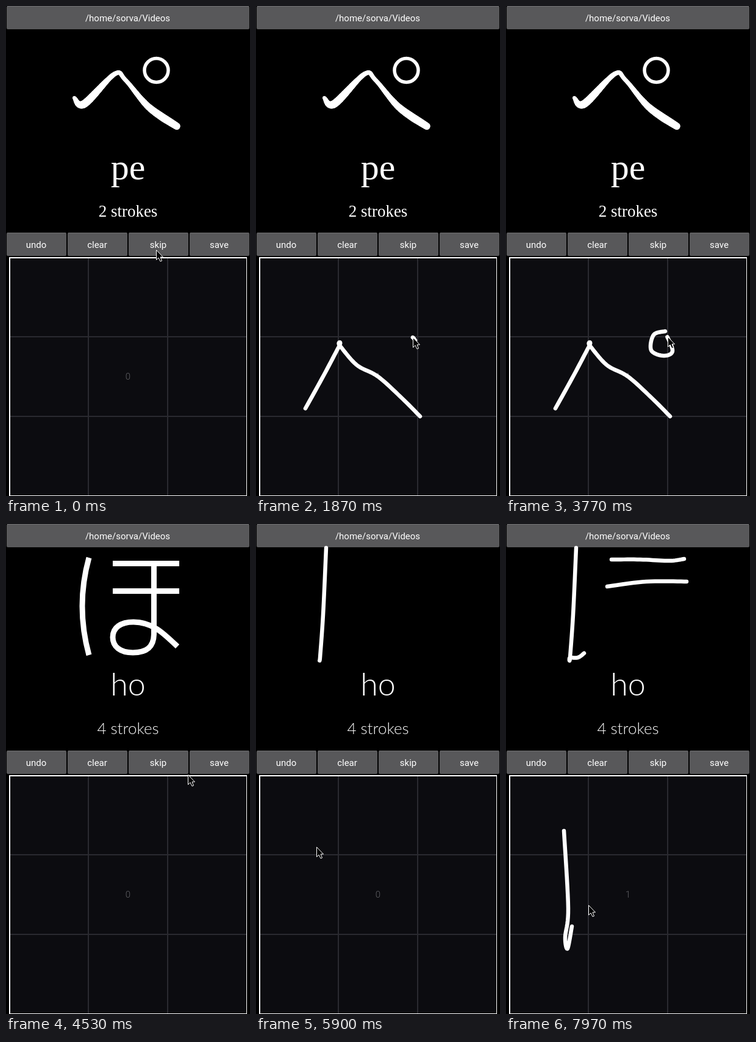
These frames come from a looping animation (400 by 800 pixels, 8000 ms). An HTML page with a canvas:

```html
<!DOCTYPE html>
<html lang="en">
<head>
<meta charset="utf-8">
<title>Kana practice</title>
<style>
  html, body { margin: 0; width: 100%; height: 100%; overflow: hidden; background: #000; }
  canvas { display: block; }
</style>
</head>
<body>
<canvas id="stage" width="400" height="800"></canvas>
<script>
const LOOP = 8000;
const UNDO = 2720, SAVE = 4260, DEMO = 5080;
const WHITE = '#fff';
const ctx = document.getElementById('stage').getContext('2d');

const mix = (a, b, k) => a + (b - a) * k;
const smooth = k => k * k * (3 - 2 * k);
const progress = (s, t) => Math.max(0, Math.min(1, (t - s.from) / (s.to - s.from)));

// Catmull-Rom curve through key points; a doubled point makes a corner
function curve(text) {
  const keys = text.split(' ').map(p => p.split(',').map(Number));
  const at = i => keys[Math.max(0, Math.min(keys.length - 1, i))];
  const points = [keys[0]];
  for (let i = 0; i < keys.length - 1; i++) {
    for (let k = 0.1; k < 1.05; k += 0.1) {
      points.push([0, 1].map(axis => {
        const [a, b, c, d] = [-1, 0, 1, 2].map(n => at(i + n)[axis]);
        return b + k / 2 * (c - a + k * (2 * a - 5 * b + 4 * c - d + k * (3 * (b - c) + d - a)));
      }));
    }
  }
  return points;
}

const stroke = (from, to, until, keys) => ({ from, to, until, points: curve(keys) });
const pause = (from, to, x, y) => ({ from, to, points: [[x, y]] });

// Strokes drawn by hand in the practice square
const penStrokes = [
  stroke(860, 1600, SAVE, '81,657 111,603 137,554 137,554 165,586 200,605 240,641 269,670'),
  stroke(1840, 2280, UNDO, '261,546 255,541 244,555 261,580 281,568 275,562'),
  stroke(3470, 3793, SAVE, '261,531 242,537 238,562 258,571 273,563 261,533'),
  stroke(7230, 7800, LOOP, '95,501 102,627 97,675 101,693 108,657')
];

// Strokes demonstrated above the label
const demoStrokes = [
  stroke(DEMO, 6040, LOOP, '115,39 110,148 105,218 105,218 118,218 128,211'),
  stroke(6380, 7120, LOOP, '173,58 220,58 268,60 292,57'),
  stroke(7220, 7860, LOOP, '166,102 230,94 296,94')
];

// The cursor follows the pen and rests on skip, undo, save and the square
const cursorSteps = [
  ...penStrokes,
  pause(0, 120, 246, 398),
  pause(2670, 2800, 82, 399),
  pause(4130, SAVE, 355, 376),
  pause(5150, 6370, 99, 527),
  pause(7970, LOOP, 135, 622)
].sort((a, b) => a.from - b.from);

const peLine = curve('112,150 128,160 178,111 196,121 234,165 281,197');
const bigHo = new Path2D(`M136,55 Q114,134 136,214 M175,64.5 H284 M175,109.5 H284
  M242.5,65 V180 C242,203 228,210 208,210 C187,210 175,200 175,185
  C175,169 188,160 209,160 C240,160 258,178 281,200`);
const arrow = new Path2D('M0.5,0.5 V16.5 L4,13 L7,19 L9.5,18 L7,12 H11.5 Z');

// The first part of a line, measured along its length
function partial(points, part) {
  const lengths = points.slice(1).map((p, i) => Math.hypot(p[0] - points[i][0], p[1] - points[i][1]));
  let left = part * lengths.reduce((a, b) => a + b, 0);
  const result = [points[0]];
  for (let i = 0; i < lengths.length && left > 0; i++) {
    const k = Math.min(1, left / (lengths[i] || 1));
    result.push([0, 1].map(axis => mix(points[i][axis], points[i + 1][axis], k)));
    left -= lengths[i];
  }
  return result;
}

function setLine(width, cap = 'round', join = 'round') {
  ctx.strokeStyle = WHITE;
  ctx.lineWidth = width;
  ctx.lineCap = cap;
  ctx.lineJoin = join;
}

function drawStroke(s, t) {
  if (t < s.from || t >= s.until) return;
  ctx.beginPath();
  partial(s.points, progress(s, t)).forEach(p => ctx.lineTo(...p));
  setLine(6.5);
  ctx.stroke();
}

function cursorAt(t) {
  const index = cursorSteps.findLastIndex(s => t >= s.from);
  const step = cursorSteps[index], next = cursorSteps[index + 1];
  if (t < step.to || !next) return partial(step.points, progress(step, t)).at(-1);
  const [x, y] = step.points.at(-1);
  const k = smooth((t - step.to) / (next.from - step.to));
  return [mix(x, next.points[0][0], k), mix(y, next.points[0][1], k)];
}

function label(text, x, baseline, font, color = WHITE) {
  ctx.font = font;
  ctx.fillStyle = color;
  ctx.textAlign = 'center';
  ctx.fillText(text, x, baseline);
}

function box(color, x, y, width, height) {
  ctx.fillStyle = color;
  ctx.fillRect(x, y, width, height);
}

function button(text, x, y, width) {
  ctx.fillStyle = '#58585a';
  ctx.beginPath();
  ctx.roundRect(x, y, width, 38, 2);
  ctx.fill();
  box('#707072', x + 1, y, width - 2, 1);
  label(text, x + width / 2 - 0.5, y + 25, '15px Roboto, sans-serif');
}

function drawGrid(count) {
  box(WHITE, 5, 410, 390, 390);
  box('#0c0c10', 7, 412, 387, 387);
  for (const offset of [0, 130]) {
    box('#2a2a30', 134 + offset, 412, 2, 387);
    box('#2a2a30', 7, 539 + offset, 387, 2);
  }
  label(count, 200, 610, '300 15px Roboto, sans-serif', '#606064');
}

function drawPe() {
  // A brush whose width swells and thins along the line
  ctx.fillStyle = WHITE;
  for (let k = 0; k <= 1; k += 0.005) {
    const [x, y] = partial(peLine, k).at(-1);
    ctx.beginPath();
    ctx.arc(x, y, Math.min(3 + 40 * k, 4.8 + 1.5 * Math.cos(8 * (k - 0.1))), 0, 7);
    ctx.fill();
  }
  setLine(5.5);
  ctx.beginPath();
  ctx.arc(246.5, 105, 19.5, 0, 7);
  ctx.stroke();
  label('pe', 200, 283, '60px "Liberation Serif", serif');
  label('2 strokes', 200, 344, '27px "Liberation Serif", serif');
}

function drawHo(t) {
  if (t < DEMO) {
    setLine(9, 'butt', 'miter');
    ctx.stroke(bigHo);
  }
  demoStrokes.forEach(s => drawStroke(s, t));
  label('ho', 200, 280, '300 52px Lato, sans-serif');
  label('4 strokes', 200, 343, '300 26px Lato, sans-serif');
}

function drawCursor(t) {
  ctx.save();
  ctx.translate(...cursorAt(t).map(Math.round));
  ctx.fillStyle = '#000';
  setLine(1, 'butt', 'miter');
  ctx.fill(arrow);
  ctx.stroke(arrow);
  ctx.restore();
}

function draw(t) {
  box('#000', 0, 0, 400, 800);
  button('/home/sorva/Videos', 1, 0, 398);
  ['undo', 'clear', 'skip', 'save'].forEach((name, i) => button(name, 1 + i * 100, 370, 98));
  drawGrid(penStrokes.filter(s => t >= s.to && t < s.until).length);
  if (t < SAVE) drawPe(); else drawHo(t);
  penStrokes.forEach(s => drawStroke(s, t));
  drawCursor(t);
}

const start = performance.now();
function frame() {
  draw((performance.now() - start) % LOOP);
  requestAnimationFrame(frame);
}
frame();
</script>
</body>
</html>
```
